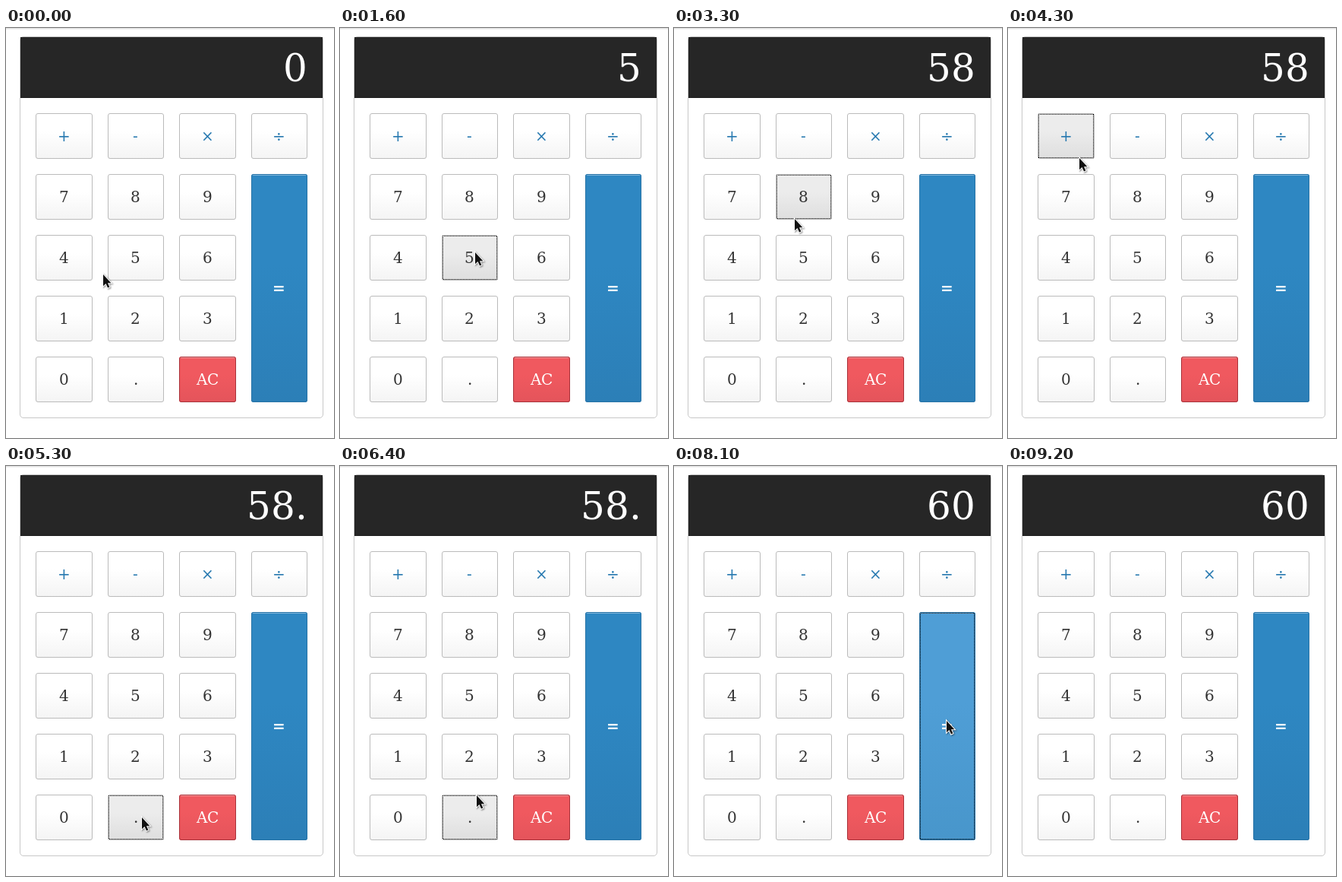
An HTML page with a canvas that plays this animation: 432 px wide and 539 px high, repeating every 9.4 s.

```html
<!DOCTYPE html>
<html lang="en">
<head>
<meta charset="utf-8">
<title>Calculator</title>
<style>
  html, body { margin: 0; width: 100%; height: 100%; overflow: hidden; background: #fff; }
  canvas { display: block; }
</style>
</head>
<body>
<canvas id="stage" width="432" height="539"></canvas>
<script>
const ctx = document.getElementById('stage').getContext('2d');
const LOOP = 9400, STEP = 100;
const FONT = '"DejaVu Serif", serif';

// Fills are [top, bottom] of a gradient.
const light = { border: '#bbb', fill: ['#fff', '#f4f4f4'], hover: ['#ececec', '#dedede'] };
const STYLES = {
  digit: { ...light, text: '#333' },
  op: { ...light, text: '#2779b0' },
  equals: { text: '#fff', weight: 'bold', border: '#2672a6', fill: ['#2e87c2', '#2c7fb7'], hover: ['#4f9ed6', '#4896cb'] },
  clear: { text: '#fff', border: '#a8323a', fill: ['#f0595f', '#e4545b'], hover: ['#f4777c', '#e86d73'] }
};

const keys = [];
function addKey(label, col, row, style, rows = 1) {
  const left = 39 + col * 94.5;
  const x = Math.round(left);
  keys.push({
    label, style: STYLES[style], x, y: 112 + row * 80,
    w: Math.round(left + 74.5) - x, h: rows * 80 - 20, cx: left + 37.25
  });
}
['+-×÷', '789', '456', '123', '0.'].forEach((line, row) =>
  [...line].forEach((c, col) => addKey(c, col, row, row ? 'digit' : 'op')));
addKey('AC', 2, 4, 'clear');
addKey('=', 3, 1, 'equals', 4);

// Pointer moves: [start, end, x, y]
const HOME = [128, 324], EXIT = 9200;
const MOVES = [
  [700, 1100, 178, 303],
  [1500, 2000, 182, 229],
  [2600, 2700, 185, 323],
  [2700, 2900, 238, 373],
  [2900, 3600, 107, 172],
  [3600, 3900, 86, 146],
  [4200, 4300, 94, 171],
  [4300, 4900, 179, 462],
  [6000, 7000, 181, 379],
  [7200, 7300, 211, 365],
  [7300, 7900, 359, 335],
  [8200, 9100, 49, 4]
];
const PRESSES = [[1100, '5'], [2000, '8'], [3900, '+'], [5100, '.'], [6900, '2'], [7900, '=']];
const REPLY = 200;

const ease = k => k * k * (3 - 2 * k);

function pointerAt(t) {
  let [x, y] = HOME;
  for (const [start, end, tx, ty] of MOVES) {
    const k = ease(Math.min(1, Math.max(0, (t - start) / (end - start))));
    x += (tx - x) * k;
    y += (ty - y) * k;
  }
  return [Math.round(x), Math.round(y)];
}

function focusAt(t) {
  const done = PRESSES.filter(([at]) => at <= t);
  return done.length && t < EXIT ? done[done.length - 1][1] : '';
}

function displayAt(t) {
  let shown = '0', sum = 0, fresh = true;
  for (const [at, key] of PRESSES) {
    if (at + REPLY > t) break;
    if (key === '+') {
      sum = +shown;
      fresh = true;
    } else if (key === '=') {
      shown = String(sum + +shown);
    } else if (key === '.') {
      shown += key;
    } else {
      shown = fresh ? key : shown + key;
      fresh = false;
    }
  }
  return shown;
}

function box(x, y, w, h, r) {
  ctx.beginPath();
  ctx.roundRect(x, y, w, h, r);
}

// Sets glyphs on whole pixels; align is 0.5 for centred, 1 for right.
function text(str, x, y, size, color, align, weight = 'normal') {
  ctx.font = `${weight} ${size}px ${FONT}`;
  ctx.fillStyle = color;
  const widths = [...str].map(c => Math.round(ctx.measureText(c).width));
  let left = Math.round(x - align * widths.reduce((a, b) => a + b));
  [...str].forEach((c, i) => {
    ctx.fillText(c, left, y);
    left += widths[i];
  });
}

function dottedRect(x, y, w, h) {
  ctx.fillStyle = '#000';
  for (let i = 0; i < w; i += 2) {
    ctx.fillRect(x + i, y, 1, 1);
    ctx.fillRect(x + w - 1 - i, y + h - 1, 1, 1);
  }
  for (let j = 0; j < h; j += 2) {
    ctx.fillRect(x, y + j, 1, 1);
    ctx.fillRect(x + w - 1, y + h - 1 - j, 1, 1);
  }
}

function drawKey(key, hovered, focused) {
  const { x, y, w, h, style } = key;
  const [top, bottom] = hovered ? style.hover : style.fill;
  const grad = ctx.createLinearGradient(0, y, 0, y + h);
  grad.addColorStop(0, top);
  grad.addColorStop(0.4, top);
  grad.addColorStop(1, bottom);
  box(x, y, w, h, 3);
  ctx.fillStyle = grad;
  ctx.fill();
  ctx.fillStyle = 'rgba(255,255,255,.4)';
  ctx.fillRect(x + 1, y + 1, w - 2, 1);
  box(x + 0.5, y + 0.5, w - 1, h - 1, 2.5);
  ctx.strokeStyle = style.border;
  ctx.stroke();
  if (focused) dottedRect(x + 1, y + 1, w - 2, h - 2);
  text(key.label, key.cx, y + h / 2 + 7, 20, style.text, 0.5, style.weight);
}

const ARROW = new Path2D('M0 0V15.2L3.5 12L6 17.6L8.4 16.5L6 11.2H10.4Z');
function drawPointer(x, y) {
  ctx.save();
  ctx.translate(x, y);
  ctx.shadowColor = 'rgba(0,0,0,.45)';
  ctx.shadowBlur = 2;
  ctx.shadowOffsetX = ctx.shadowOffsetY = 1;
  ctx.strokeStyle = '#fff';
  ctx.lineWidth = 2;
  ctx.stroke(ARROW);
  ctx.shadowColor = 'transparent';
  ctx.fillStyle = '#111';
  ctx.fill(ARROW);
  ctx.restore();
}

function rect(x, y, w, h, color) {
  ctx.fillStyle = color;
  ctx.fillRect(x, y, w, h);
}

function draw(t) {
  rect(0, 0, 432, 539, '#fff');
  rect(0, 0, 432, 1, '#e2e2e2');
  rect(0, 1, 432, 1, '#f0f0f0');

  ctx.lineWidth = 1;
  box(18.5, 11.5, 399, 501, 4.5);
  ctx.strokeStyle = '#c8c8c8';
  ctx.stroke();
  rect(19, 12, 398, 80, '#262626');
  rect(19, 91, 398, 1, '#1d1d1d');
  text(displayAt(t), 397, 70, 50, '#fff', 1);

  const [px, py] = pointerAt(t);
  const present = t < EXIT;
  const focus = focusAt(t);
  const slack = 4;
  for (const key of keys) {
    const hovered = present &&
      px >= key.x - slack && px < key.x + key.w + slack &&
      py >= key.y && py < key.y + key.h;
    drawKey(key, hovered, key.label === focus);
  }
  if (present) drawPointer(px, py);
}

function tick() {
  const t = performance.now() % LOOP;
  draw(Math.floor(t / STEP) * STEP);
  requestAnimationFrame(tick);
}
tick();
</script>
</body>
</html>
```
